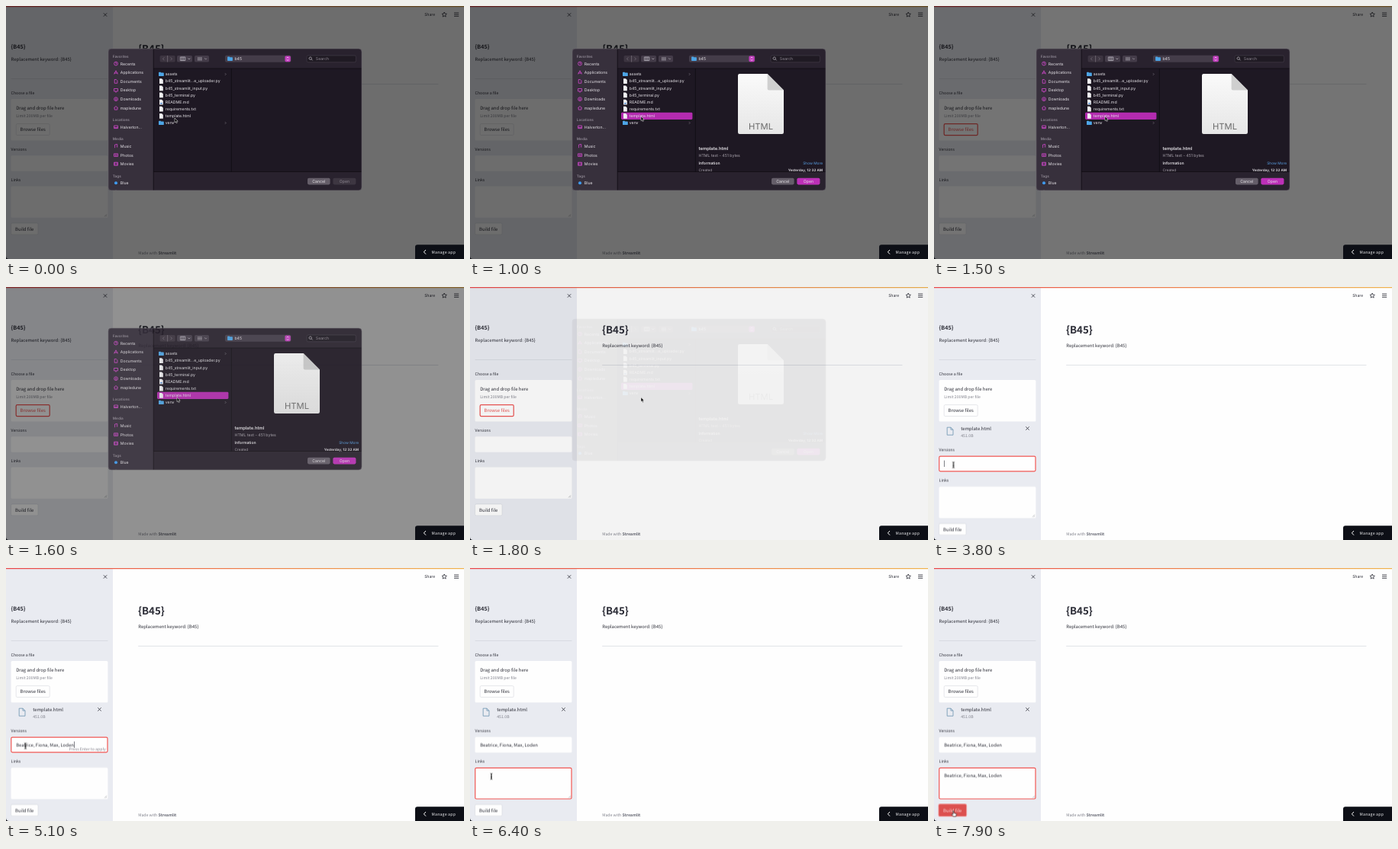
These frames come from a looping animation (600 px wide and 332 px high, 8000 ms). An HTML page:

```html
<!DOCTYPE html>
<html lang="en">
<head>
<meta charset="utf-8">
<title>File upload form</title>
<style>
html, body { margin: 0; width: 100%; height: 100%; overflow: hidden; background: #fefefe; }
svg { display: block; width: 600px; height: 332px; }
text { text-rendering: geometricPrecision; white-space: pre; }

.page { font-family: "Noto Sans CJK JP", "Noto Sans CJK SC", "Noto Sans CJK", "Noto Sans", sans-serif; font-size: 5.95px; fill: #2b2c36; }
.sm { font-size: 5.2px; }
.mute { fill: #80828c; }
.bold { font-weight: 700; }
.field { fill: #fefefe; }
.btn { fill: #fefefe; stroke: #cfd1d8; stroke-width: .5; }
.ring { fill: #fefefe; stroke: #ee5553; stroke-width: 1.2; }
.red { fill: #e8504e; }
.line { fill: none; stroke: #2b2c36; stroke-width: .8; }
.rule { stroke: #cdd0d8; stroke-width: .6; }
.caret { fill: #2b2c36; }

.panel { font-family: Inter, Roboto, sans-serif; font-size: 5.2px; fill: #e6e3e8; }
.head { font-size: 4.7px; font-weight: 600; fill: #8f8894; }
.icon { fill: none; stroke: #d548d0; stroke-width: .8; }
.dimmed { fill: #8d8791; }
.tool { fill: #443c49; }
.glyph { fill: none; stroke: #cbc6ce; stroke-width: .7; }

/* 1% of the loop is 80 ms */
.k { animation: 8s step-end infinite; }
.dim { animation-name: dim; }
@keyframes dim { 0% { opacity: .57 } 16.25% { opacity: .56 } 18.75% { opacity: .54 } 20% { opacity: .43 } 22.5% { opacity: .045 } 23.75%, 100% { opacity: 0 } }
.sheet { animation-name: sheet; }
@keyframes sheet {
  0% { opacity: 1; transform: none }
  20% { opacity: .87; transform: translateY(-2px) }
  22.5% { opacity: .065; transform: translateY(-14px) }
  23.75%, 100% { opacity: 0; transform: translateY(-16px) }
}
.picked { animation-name: picked; }
@keyframes picked { 0% { opacity: 0 } 5%, 100% { opacity: 1 } }
.preview { animation: preview 8s linear infinite; }
@keyframes preview { 0%, 6% { opacity: 0 } 10%, 100% { opacity: 1 } }
.below { animation-name: below; }
@keyframes below { 0% { transform: translateY(-25.5px) } 26.25%, 100% { transform: none } }
.row { animation-name: row; }
@keyframes row { 0% { opacity: 0 } 26.25%, 100% { opacity: 1 } }
.running { animation-name: running; }
@keyframes running { 0% { opacity: 0 } 27.5% { opacity: 1 } 32.5% { opacity: 0 } 75% { opacity: 1 } 80%, 100% { opacity: 0 } }
.browsing { animation-name: browsing; }
@keyframes browsing { 0% { opacity: 0 } 16.25% { opacity: 1 } 47.5%, 100% { opacity: 0 } }
.in-versions { animation-name: in-versions; }
@keyframes in-versions { 0% { opacity: 0 } 47.5% { opacity: 1 } 73.75%, 100% { opacity: 0 } }
.v-start { animation-name: v-start; }
@keyframes v-start { 0% { opacity: 0 } 47.5% { opacity: 1 } 53.75% { opacity: 0 } 60% { opacity: 1 } 62.5%, 100% { opacity: 0 } }
.v-text { animation-name: v-text; }
@keyframes v-text { 0% { opacity: 0 } 62.5%, 100% { opacity: 1 } }
.v-end { animation-name: v-end; }
@keyframes v-end { 0% { opacity: 0 } 62.5% { opacity: 1 } 70%, 100% { opacity: 0 } }
.v-hint { animation-name: v-hint; }
@keyframes v-hint { 0% { opacity: 0 } 63.75% { opacity: 1 } 73.75%, 100% { opacity: 0 } }
.in-links { animation-name: in-links; }
@keyframes in-links { 0% { opacity: 0 } 73.75%, 100% { opacity: 1 } }
.l-start { animation-name: l-start; }
@keyframes l-start { 0% { opacity: 0 } 73.75% { opacity: 1 } 80%, 100% { opacity: 0 } }
.l-text { animation-name: l-text; }
@keyframes l-text { 0% { opacity: 0 } 85%, 100% { opacity: 1 } }
.l-end { animation-name: l-end; }
@keyframes l-end { 0% { opacity: 0 } 85% { opacity: 1 } 91.25%, 100% { opacity: 0 } }
.l-hint { animation-name: l-hint; }
@keyframes l-hint { 0% { opacity: 0 } 85% { opacity: 1 } 96.25%, 100% { opacity: 0 } }
.hover { animation-name: hover; }
@keyframes hover { 0% { opacity: 0 } 92.5%, 100% { opacity: 1 } }
.press { animation-name: press; }
@keyframes press { 0% { opacity: 0 } 97.5%, 100% { opacity: 1 } }

.pointer { animation-name: pointer; }
@keyframes pointer {
  0% { transform: translate(221px, 147px) }
  1.25% { transform: translate(222.5px, 146px) }
  2.5% { transform: translate(224px, 144.8px) }
  35% { transform: translate(168px, 182px) }
  36.25% { transform: translate(82px, 240px) }
  37.5% { transform: translate(38.5px, 270px) }
  40% { transform: translate(33px, 234px) }
  41.25% { transform: translate(24px, 194px) }
  42.5% { transform: translate(23.5px, 212px) }
  43.75% { transform: translate(25.5px, 233.5px) }
  67.5% { transform: translate(26px, 246px) }
  68.75% { transform: translate(27.5px, 264px) }
  70% { transform: translate(28px, 273.5px) }
  88.75% { transform: translate(27.5px, 283px) }
  90% { transform: translate(27px, 295px) }
  91.25% { transform: translate(26px, 306px) }
  92.5% { transform: translate(25.5px, 314px) }
  93.75%, 100% { transform: translate(25.5px, 318.5px) }
}
.arrow { animation-name: arrow; }
@keyframes arrow { 0% { opacity: 1 } 37.5% { opacity: 0 } 41.25% { opacity: 1 } 43.75% { opacity: 0 } 91.25% { opacity: 1 } 92.5%, 100% { opacity: 0 } }
.beam { animation-name: beam; }
@keyframes beam { 0% { opacity: 0 } 37.5% { opacity: 1 } 41.25% { opacity: 0 } 43.75% { opacity: 1 } 91.25%, 100% { opacity: 0 } }
</style>
</head>
<body>
<svg viewBox="0 0 600 332">
  <defs>
    <linearGradient id="strip"><stop stop-color="#ea4f50"/><stop offset="1" stop-color="#efb657"/></linearGradient>
    <linearGradient id="paper" x2="0" y2="1"><stop stop-color="#fafafa"/><stop offset="1" stop-color="#e6e6e6"/></linearGradient>
    <clipPath id="frame"><rect x="134" y="56" width="332" height="186" rx="4"/></clipPath>
    <path id="folder" d="M-3.4-2.1q0-.7.7-.7h1.8l.8.8h2.8q.7 0 .7.7v3.2q0 .7-.7.7h-5.4q-.7 0-.7-.7z" fill="#4da5e6"/>
    <path id="file" d="M-2.4-3.4h3l1.8 1.8v5h-4.8z" fill="#f1f1f3"/>
  </defs>

  <g class="page">
    <rect width="600" height="332" fill="#fefefe"/>
    <rect width="140" height="332" fill="#e9ebf1"/>
    <rect width="600" height="1.3" fill="url(#strip)"/>
    <path class="line" d="M127.8 9.3l4.4 4.4m0-4.4l-4.4 4.4"/>
    <text class="bold" x="6.6" y="55.6" font-size="7.2">{B45}</text>
    <text x="6.6" y="72">Replacement keyword: {B45}</text>
    <path class="rule" d="M6.6 95.5H133.4"/>
    <text class="sm" x="6.6" y="116">Choose a file</text>
    <rect class="field" x="6.6" y="122" width="126.8" height="54.5" rx="1.5"/>
    <text x="13.2" y="136">Drag and drop file here</text>
    <text class="sm mute" x="13.2" y="146.3">Limit 200MB per file</text>
    <rect class="btn" x="13.2" y="154.6" width="44" height="15" rx="1.6"/>
    <text x="18.6" y="164.2">Browse files</text>
    <g class="k browsing">
      <rect class="ring" x="13.2" y="154.6" width="44" height="15" rx="1.6"/>
      <text class="red" x="18.6" y="164.2">Browse files</text>
    </g>

    <g class="k row">
      <path d="M17.2 184.2h4.8l3 3v7h-7.8zM22 184.2v3h3" fill="none" stroke="#6b93b0" stroke-width=".8"/>
      <text x="35.2" y="187.8">template.html</text>
      <text class="sm mute" x="35.2" y="197.2">451.0B</text>
      <path class="line" d="M120.3 183.3l4.4 4.4m0-4.4l-4.4 4.4"/>
    </g>

    <g class="k below">
      <text class="sm" x="6.6" y="215.6">Versions</text>
      <rect class="field" x="6.6" y="221.8" width="126.8" height="20.4" rx="1.5"/>
      <rect class="ring k in-versions" x="6.8" y="222.2" width="126.2" height="19.6" rx="1.5"/>
      <text class="k v-text names" x="13.2" y="234.2"></text>
      <rect class="caret k v-start" x="13.2" y="227.6" width=".6" height="8.4"/>
      <rect class="caret k v-end tail" x="91" y="227.6" width=".6" height="8.4"/>
      <text class="sm mute k v-hint" x="130.6" y="239.8" text-anchor="end">Press Enter to apply</text>

      <text class="sm" x="6.6" y="255.8">Links</text>
      <rect class="field" x="6.6" y="262" width="126.8" height="41.2" rx="1.5"/>
      <rect class="ring k in-links" x="6.8" y="262.4" width="126.2" height="40.6" rx="1.5"/>
      <text class="k l-text names" x="13.2" y="274.4"></text>
      <rect class="caret k l-start" x="13.2" y="267.8" width=".6" height="8.4"/>
      <rect class="caret k l-end tail" x="91" y="267.8" width=".6" height="8.4"/>
      <text class="sm mute k l-hint" x="128.6" y="301" text-anchor="end">Press ⌘+Enter to apply</text>
      <path d="M129 301.8l3-3m-1.2 3l1.2-1.2" stroke="#85878f" stroke-width=".5"/>

      <rect class="btn" x="6.6" y="310.4" width="35.4" height="15" rx="1.6"/>
      <text x="12" y="320">Build file</text>
      <g class="k hover">
        <rect class="ring" x="6.6" y="310.4" width="35.4" height="15" rx="1.6" stroke-width=".6"/>
        <text class="red" x="12" y="320">Build file</text>
      </g>
      <g class="k press">
        <rect x="5.4" y="309.2" width="37.8" height="17.4" rx="2.4" fill="#efa3a3"/>
        <rect x="6.4" y="310.2" width="35.8" height="15.4" rx="1.6" fill="#dc504f"/>
        <text x="12" y="320" fill="#f8d5d5">Build file</text>
      </g>
    </g>

    <text class="bold" x="173" y="61.2" font-size="13.3">{B45}</text>
    <text x="173.2" y="79">Replacement keyword: {B45}</text>
    <path class="rule" d="M173.2 102.5H566.4"/>
    <text class="sm mute" x="173.2" y="326">Made with <tspan class="bold" fill="#666873">Streamlit</tspan></text>

    <g class="k running">
      <g fill="none" stroke="#a9abb2" stroke-width="1">
        <circle cx="481.4" cy="7.8" r=".9" fill="#a9abb2" stroke="none"/>
        <path d="M478 10h6.8M481.4 9.5v3.2l-1.4 3m1.4-3l1.4 3"/>
      </g>
      <text class="sm" x="490" y="13" fill="#b3b5bb">RUNNING...</text>
      <text class="sm" x="526.4" y="13">Stop</text>
    </g>
    <text class="sm" x="548.2" y="13">Share</text>
    <path class="line" stroke-linejoin="round" d="M574.2 8l.95 2.1 2.25.25-1.7 1.5.5 2.25-2-1.15-2 1.15.5-2.25-1.7-1.5 2.25-.25z"/>
    <path class="line" d="M587 9h6.2M587 11.2h6.2M587 13.4h6.2"/>
  </g>

  <rect class="k dim" width="600" height="332"/>
  <path d="M536 332V316.2q0-3 3-3H600V332zM0 328q0 4 4 4H0z" fill="#0d0f16"/>
  <path d="M550 320l-2.6 2.8 2.6 2.8" fill="none" stroke="#fff"/>
  <text class="page sm" x="557.6" y="324.8" style="fill:#f3f3f5" letter-spacing=".2">Manage app</text>

  <g class="panel k sheet">
    <g clip-path="url(#frame)">
      <rect x="134" y="56" width="332" height="186" fill="#29222e"/>
      <rect x="193" y="82" width="273" height="135.5" fill="#1e1823"/>
      <rect x="134" y="56" width="59" height="186" fill="#37303c"/>
      <path d="M193.2 56V242M193 82H466M193 217.5H466M295.4 82V217.5" stroke="#0e0b11" stroke-width=".7"/>
      <g id="places"></g>
    </g>
    <rect x="134" y="56" width="332" height="186" rx="4" fill="none" stroke="#6b656e" stroke-width=".6"/>

    <rect class="tool" x="201.6" y="65" width="20" height="8.6" rx="1.6" opacity=".7"/>
    <path class="glyph" opacity=".45" d="M207.3 67.4l-1.8 1.9 1.8 1.9M215.6 67.4l1.8 1.9-1.8 1.9M211.6 65v8.6"/>
    <rect class="tool" x="224" y="65" width="20" height="8.6" rx="1.6"/>
    <path class="glyph" d="M228.4 67h6.4v4.6h-6.4zM230.5 67v4.6M232.7 67v4.6M238.4 68.6l1.4 1.4 1.4-1.4"/>
    <rect class="tool" x="247" y="65" width="19" height="8.6" rx="1.6"/>
    <path class="glyph" d="M251 67.8h5.6M251 69.4h5.6M251 71h5.6M260.2 68.6l1.4 1.4 1.4-1.4" stroke-dasharray="1.6 .4"/>
    <rect class="tool" x="287" y="64.8" width="86.4" height="9" rx="1.8"/>
    <use href="#folder" x="293.5" y="69.3"/>
    <text x="299.4" y="71.2">b45</text>
    <rect x="365.4" y="65.4" width="7.4" height="7.8" rx="1.6" fill="#c13cbd"/>
    <path d="M367.8 68.4l1.3-1.4 1.3 1.4M367.8 70.2l1.3 1.4 1.3-1.4" fill="none" stroke="#fff" stroke-width=".7"/>
    <rect x="394" y="65" width="64.4" height="8.8" rx="1.8" fill="#1f1a23" stroke="#4b4450" stroke-width=".5"/>
    <path class="glyph" d="M401.6 71.4l-1.6-1.6a1.7 1.7 0 1 0-.2.2"/>
    <text class="dimmed" x="405.8" y="71.3">Search</text>

    <rect class="k picked" x="198" y="139.8" width="93.4" height="9.2" rx="1.4" fill="#b32baf"/>
    <g id="files"></g>

    <g class="preview">
      <path d="M353.2 89h36.4l21.4 21.4v55.4q0 2.2-2.2 2.2h-55.6q-2.2 0-2.2-2.2v-74.6q0-2.2 2.2-2.2z" fill="url(#paper)"/>
      <path d="M389.6 89v19.2q0 2.2 2.2 2.2H411z" fill="#cfcfcf"/>
      <text x="381" y="161.6" font-size="11.2" text-anchor="middle" style="fill:#6a6a6a">HTML</text>
      <text x="299.6" y="189.4" font-size="5.8" font-weight="600">template.html</text>
      <text class="dimmed" x="299.6" y="198" style="fill:#aaa4ad">HTML text - 451 bytes</text>
      <text x="299.6" y="207.8" font-size="5" font-weight="600">Information</text>
      <text x="462" y="207.8" font-size="4.8" text-anchor="end" style="fill:#5aa2e8">Show More</text>
      <text x="299.6" y="216.8" font-size="4.7" style="fill:#aaa4ad">Created</text>
      <text x="462" y="216.8" font-size="4.6" font-weight="600" text-anchor="end">Yesterday, 12:32 AM</text>
    </g>

    <rect x="395" y="225.8" width="29.6" height="8.6" rx="1.8" fill="#655e69"/>
    <text x="409.8" y="232" text-anchor="middle">Cancel</text>
    <rect x="428.4" y="225.8" width="30" height="8.6" rx="1.8" fill="#3d3641"/>
    <text class="dimmed" x="443.4" y="232" text-anchor="middle">Open</text>
    <g class="k picked">
      <rect x="428.4" y="225.8" width="30" height="8.6" rx="1.8" fill="#bd30b8"/>
      <text x="443.4" y="232" text-anchor="middle">Open</text>
    </g>
  </g>

  <g class="k pointer">
    <path class="k arrow" d="M0 0v5.8l1.3-1.2.9 2.1 1.1-.5-.9-2h1.8z" fill="#000" stroke="#fff" stroke-width=".5"/>
    <path class="k beam" d="M-1.4-4Q0-4 0-3V3Q0 4-1.4 4M1.4-4Q0-4 0-3V3Q0 4 1.4 4M-.8.9h1.6" fill="none" stroke="#111" stroke-width=".7"/>
    <path class="k hover" d="M-.6.4Q0-.6.6.4V3l2.6.7q.7.3.6 1.1l-.6 2.8h-3.4L-2.4 4.8q.2-1 1.8 0z" fill="#fff" stroke="#111" stroke-width=".6"/>
  </g>
</svg>
<script>
const $ = id => document.getElementById(id);
const label = (x, y, text, cls = "") => `<text class="${cls}" x="${x}" y="${y}">${text}</text>`;

// Sidebar: name, centre line, icon path around its own origin; headings have no icon
const places = [
  ["Favorites", 66], ["Recents", 75.6, "M-2.4 0a2.4 2.4 0 1 0 4.8 0a2.4 2.4 0 1 0-4.8 0M0-1.5V0h1.2"],
  ["Applications", 87.2, "M-2.3 2.3L0-2.4 2.3 2.3M-2.4.8h4.8"], ["Documents", 98.9, "M-1.8-2.4h2.2l1.4 1.4v3.4h-3.6z"],
  ["Desktop", 110.5, "M-2.5-2h5v3.4h-5zM-1 2.4h2"], ["Downloads", 122.2, "M-2.4 0a2.4 2.4 0 1 0 4.8 0a2.4 2.4 0 1 0-4.8 0M0-1.4V1.2M-1 .2l1 1 1-1"],
  ["mapledune", 133.8, "M-2.6 0L0-2.3 2.6 0M-1.8-.5v2.8h3.6v-2.8"],
  ["Locations", 149.6], ["Halverton...", 158.8, "M-2.4-1.8h4.8v3.6h-4.8zM-2.4.6h4.8"],
  ["Media", 174.6], ["Music", 184, "M-1.4 1.8V-2l3-.6v3.8M-2 1.8h.6M1 1.2h.6"],
  ["Photos", 195.6, "M-2.5-1.8h5v3.6h-5zM-.9 0a.9.9 0 1 0 1.8 0a.9.9 0 1 0-1.8 0"],
  ["Movies", 207.2, "M-2.4-2h4.8v4h-4.8zM-1.2-2v4M1.2-2v4"], ["Tags", 223]
];
const tags = [["Blue", 232.2, "#3f9bf0"], ["Gray", 243.8, "#98989d"]];

$("places").innerHTML =
  places.map(([name, y, icon]) => icon
    ? `<path class="icon" transform="translate(144 ${y})" d="${icon}"/>` + label(149.8, y + 1.9, name)
    : label(139.8, y + 1.8, name, "head")).join("") +
  tags.map(([name, y, color]) => `<circle cx="144" cy="${y}" r="2" fill="${color}"/>` + label(149.8, y + 1.9, name)).join("");

const files = ["assets/", "b45_streamlit...e_uploader.py", "b45_streamlit_input.py", "b45_terminal.py",
  "README.md", "requirements.txt", "template.html", "venv/"];
$("files").innerHTML = files.map((name, i) => {
  const y = 89.5 + i * 9.14, dir = name.endsWith("/");
  return `<use href="#${dir ? "folder" : "file"}" x="203.4" y="${y}"/>` + label(208.8, y + 1.8, name.replace("/", "")) +
    (dir ? `<path class="glyph" opacity=".5" d="M286.8 ${y - 1.4}l1.4 1.4-1.4 1.4"/>` : "") +
    (name === "README.md" ? `<path d="M202.2 ${y + 1}h2.4v1.4h-2.4z" fill="#3b7fd0"/>` : "");
}).join("");

// Carets sit right after the entered names
const tails = document.querySelectorAll(".tail");
document.querySelectorAll(".names").forEach((el, i) => {
  el.textContent = "Beatrice, Fiona, Max, Loden";
  tails[i].setAttribute("x", 13.4 + el.getComputedTextLength());
});
</script>
</body>
</html>
```
